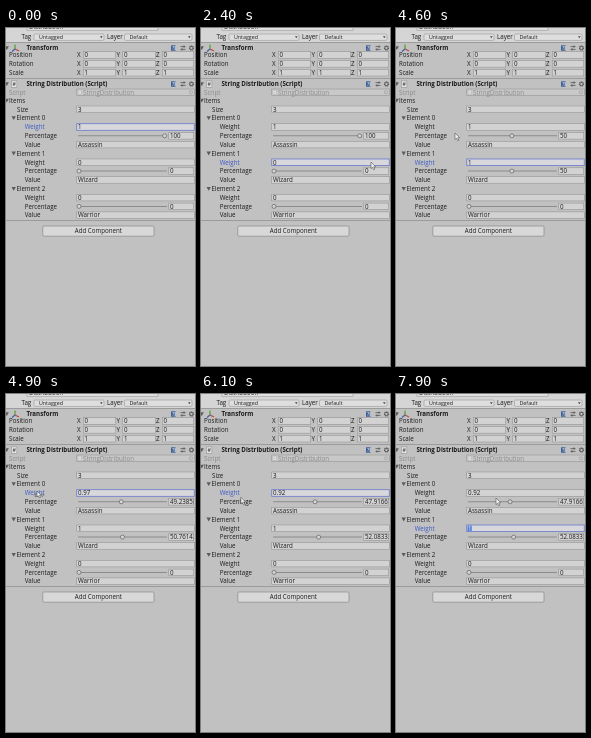
Recreate the animation shown at these times as an HTML page. Size 189 by 338 pixels, loop 8 s.

```html
<!DOCTYPE html>
<html lang="en">
<head>
<meta charset="utf-8">
<style>
  html, body { margin: 0; width: 100%; height: 100%; overflow: hidden; background: #c1c1c1; }
  svg { display: block; width: 100vw; height: 100vh; }
  text { font-family: "Open Sans", "Noto Sans", sans-serif; font-size: 6.2px; fill: #1c1c1c; }
  .bold { font-weight: 700; }
  .small { font-size: 5.3px; }
  .dim { fill: #8a8a8a; }
</style>
</head>
<body>
<svg id="stage" viewBox="0 0 189 338" preserveAspectRatio="none"></svg>
<script>
const LOOP = 8000, STEP = 100;
const BLUE = '#3f5cc4', PANEL = '#c1c1c1', EDGE = '#8c8c8c';
const stage = document.getElementById('stage');

function add(tag, attrs, parent = stage) {
  const node = document.createElementNS('http://www.w3.org/2000/svg', tag);
  set(node, attrs);
  parent.appendChild(node);
  return node;
}
function set(node, attrs) {
  for (const key in attrs) node.setAttribute(key, attrs[key]);
}
function rect(x, y, width, height, fill, more = {}) {
  return add('rect', { x, y, width, height, fill, ...more });
}
function label(str, x, mid, cls = '') {
  const node = add('text', { x, y: mid + 2.2, class: cls });
  node.textContent = str;
  return node;
}
function field(x, mid, width, str = '') {
  const box = rect(x + .25, mid - 3.3, width - .5, 6.6, '#d2d2d2', { stroke: EDGE, 'stroke-width': .5 });
  const mark = rect(x + 1.2, mid - 2.7, 4, 5.4, '#4a78d8', { opacity: 0 });
  const clip = add('svg', { x, y: mid - 4, width: width - .6, height: 8 });
  const text = add('text', { x: 1.5, y: 6.2 }, clip);
  text.textContent = str;
  return { box, mark, text };
}
function fold(x, mid) {
  add('path', { d: `M${x} ${mid - 1.7}h4.4l-2.2 3.8z`, fill: '#5c5c5c' });
}
function popup(x, width, str) {
  rect(x, 6, width, 6.4, '#dedede', { rx: 1.2, stroke: '#888', 'stroke-width': .5 });
  label(str, x + 5, 9.1, 'small');
  add('path', { d: `M${x + width - 4} 8.3h2.6l-1.3 2z`, fill: '#444' });
}
function header(str, mid) {
  rect(0, mid - 6, 189, .7, EDGE);
  fold(-1.5, mid);
  label(str, 20.4, mid, 'bold');
  rect(165, mid - 2.8, 5, 5.6, '#3c5f94', { rx: .5 });
  rect(168.7, mid - 2.4, 1, 4.8, '#e6e6e6');
  label('?', 165.9, mid - .2, 'small').style.fill = '#fff';
  // Preset sliders, then the gear
  add('path', { d: `M174.5 ${mid - 1.4}h5M174.5 ${mid + 1.4}h5M178 ${mid - 2.6}v2.4M176 ${mid + .2}v2.4`, stroke: '#555', 'stroke-width': .8 });
  add('circle', { cx: 185.5, cy: mid, r: 1.8, fill: 'none', stroke: '#555', 'stroke-width': 1.5, 'stroke-dasharray': '1.1 .3' });
}
function slider(mid) {
  rect(72, mid - .5, 89, 1, EDGE, { rx: .5 });
  return add('circle', { cy: mid, r: 2, fill: '#d6d6d6', stroke: '#606060', 'stroke-width': .7 });
}

rect(0, 0, 189, 338, PANEL);

// Object header
rect(0, 0, 189, 14, '#d5d5d5');
rect(21, -4, 131, 6.2, '#e0e0e0', { stroke: EDGE, 'stroke-width': .5 });
label('Distribution', 23, -1.2);
label('Tag', 15.5, 9);
popup(28, 70, 'Untagged');
label('Layer', 101, 9);
popup(118.5, 67.5, 'Default');

header('Transform', 20);
add('path', { d: 'M9 21V16.5', stroke: '#56a33a', 'stroke-width': 1.3 });
add('path', { d: 'M9 21l4 2', stroke: '#c44a3c', 'stroke-width': 1.3 });
add('path', { d: 'M9 21l-3 2.4', stroke: '#3c64b8', 'stroke-width': 1.3 });
['Position', 'Rotation', 'Scale'].forEach((name, row) => {
  const mid = 27 + row * 8.85;
  label(name, 3, mid);
  [[71, 'X'], [110.5, 'Y'], [150, 'Z']].forEach(([x, axis]) => {
    label(axis, x, mid);
    field(x + 6, mid, x === 150 ? 32 : 33, row === 2 ? '1' : '0');
  });
});

header('String Distribution (Script)', 56);
rect(5.5, 52.9, 5.4, 6.4, '#e4e4e4', { stroke: '#888', 'stroke-width': .5 });
label('#', 6.6, 56, 'small');
label('Script', 3, 64.3, 'dim');
field(70.5, 64.3, 118).box.style.fill = '#c8c8c8';
rect(72, 62, 3.5, 4.6, '#d9d9d9', { stroke: '#aaa', 'stroke-width': .4 });
label('StringDistribution', 77, 64.3, 'dim');
add('circle', { cx: 185, cy: 64.3, r: 1.6, fill: 'none', stroke: '#999', 'stroke-width': .6 });
fold(-1.5, 72.5);
label('Items', 3, 72.5);
label('Size', 11, 81.3);
field(70.5, 81.3, 118, '3');

const items = ['Assassin', 'Wizard', 'Warrior'].map((name, i) => {
  const top = 90 + i * 35.3;
  fold(5.5, top);
  label('Element ' + i, 10.4, top);
  const title = label('Weight', 18.7, top + 9);
  const weight = field(70.5, top + 9, 118);
  label('Percentage', 18.7, top + 17.8);
  const knob = slider(top + 17.8);
  const percent = field(162.5, top + 17.8, 25.5);
  label('Value', 18.7, top + 26.6);
  field(70.5, top + 26.6, 118, name);
  return { title, weight, knob, percent };
});

rect(0, 192, 189, .7, EDGE);
rect(36.8, 198, 111.2, 10.2, '#d8d8d8', { rx: 1.2, stroke: '#7d7d7d', 'stroke-width': .6 });
label('Add Component', 92.4, 203).setAttribute('text-anchor', 'middle');

const pointer = { fill: '#f4f4f4', stroke: '#555', 'stroke-width': .6 };
const shapes = {
  arrow: add('path', { d: 'M0 0v6.6l1.5-1.3 1.2 2.5 1.2-.6-1.2-2.4h2z', ...pointer }),
  beam: add('path', { d: 'M-1.2-3.4h2.4M0-3.4v6.8M-1.2 3.4h2.4', stroke: '#444', 'stroke-width': .7, fill: 'none' }),
  drag: add('path', { d: 'M-1-1v6l1.4-1.2 1 2.2 1.1-.5-1-2.1h1.8zM-2.4 1.7l-2 1.5 2 1.5zM4 1.7l2 1.5-2 1.5z', ...pointer })
};

// time, x, y, shape, glide to the next row
const moves = [
  [0, 0, 0, ''],
  [1800, 180, 132, 'arrow', 1],
  [2100, 170, 134, 'arrow'],
  [2800, 0, 0, ''],
  [4000, 140, 126, 'arrow', 1],
  [4800, 32, 98, 'drag'],
  [4900, 32, 98, 'drag', 1],
  [5300, 27, 98, 'drag'],
  [5500, 25.5, 98, 'drag', 1],
  [5800, 31, 98, 'drag'],
  [6000, 31, 98, 'arrow', 1],
  [6600, 84, 129, 'arrow'],
  [6700, 91, 133, 'beam'],
  [6800, 94, 134.5, 'beam'],
  [7700, 96, 125, 'arrow', 1],
  [7900, 100, 104, 'arrow']
];

// time, weight 0, weight 1, glide
const weights = [
  [0, 1, 0],
  [2800, 1, 1],
  [4900, .97, 1, 1],
  [5300, .6, 1],
  [5500, .53, 1, 1],
  [5800, .92, 1]
];

// time, focused item, text selected
const focuses = [[0, 0, 0], [2400, 1, 0], [2500, 1, 1], [2800, 1, 0], [4900, 0, 0], [7200, 1, 1]];

function sample(rows, t, glide) {
  let i = rows.length - 1;
  while (rows[i][0] > t) i--;
  const a = rows[i], b = rows[i + 1];
  if (!b || !a[glide]) return a;
  const k = (t - a[0]) / (b[0] - a[0]);
  return a.map((v, n) => typeof v === 'number' ? v + (b[n] - v) * k : v);
}

function draw(t) {
  const [, w0, w1] = sample(weights, t, 3);
  const values = [+w0.toFixed(2), w1, 0];
  const total = values[0] + values[1];
  const [, active, selected] = sample(focuses, t);
  items.forEach(({ title, weight, knob, percent }, i) => {
    const share = values[i] / total * 100;
    const on = i === active, marked = on && selected;
    title.style.fill = on ? BLUE : '';
    set(weight.box, { stroke: on ? '#6878cc' : EDGE, 'stroke-width': on ? .8 : .5, fill: on ? '#d8d8dc' : '#d2d2d2' });
    set(weight.mark, { opacity: marked ? 1 : 0 });
    weight.text.style.fill = marked ? '#fff' : '';
    weight.text.textContent = values[i];
    set(knob, { cx: 73 + share * .857 });
    percent.text.textContent = +share.toFixed(5);
  });
  const [, x, y, shape] = sample(moves, t, 4);
  for (const key in shapes) {
    set(shapes[key], { visibility: key === shape ? 'visible' : 'hidden', transform: `translate(${x} ${y})` });
  }
}

const start = performance.now();
function tick(now) {
  const t = Math.max(0, now - start) % LOOP;
  draw(Math.floor(t / STEP) * STEP);
  requestAnimationFrame(tick);
}
draw(0);
requestAnimationFrame(tick);
</script>
</body>
</html>
```
